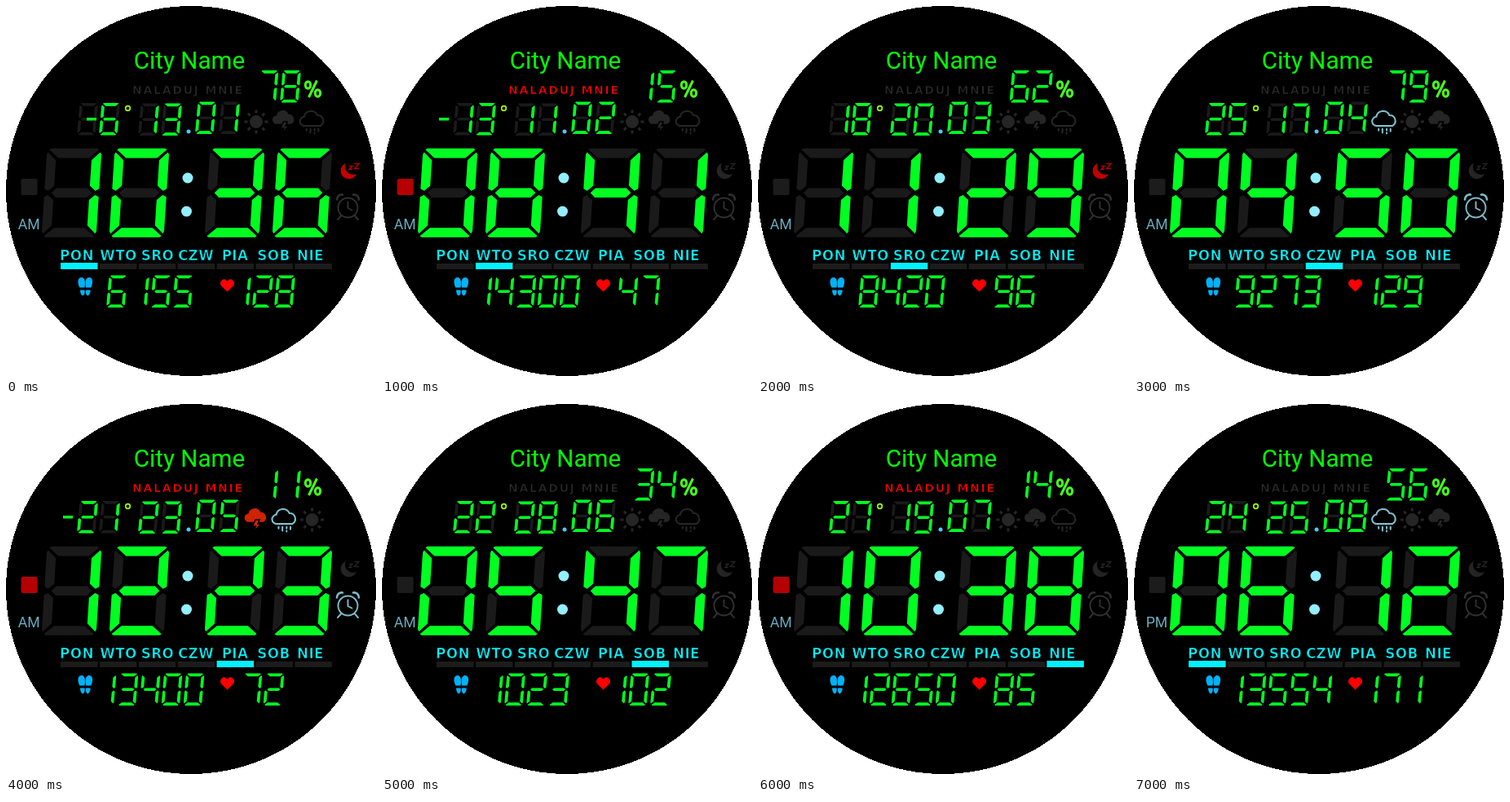
An HTML page for the animation above (8 s loop, 454x454 px).

```html
<!DOCTYPE html>
<html lang="pl">
<head>
<meta charset="utf-8">
<title>Digital watch face</title>
<style>
html, body { margin: 0; width: 100%; height: 100%; overflow: hidden; background: #fff; }
svg { display: block; width: 100vw; height: 100vh; }
.day, #charge { font-family: "DejaVu Sans", sans-serif; font-weight: 700; stroke: #000; stroke-width: .7; }
.day { font-size: 16.8px; letter-spacing: .4px; fill: #00f4ff; text-anchor: middle; }
#charge { font-size: 14px; letter-spacing: 1.75px; }
</style>
</head>
<body>
<svg viewBox="0 0 454 454">
  <defs>
    <path id="cloud" d="M-10 5a6 6 0 0 1-1-12a9 9 0 0 1 17-2a7.5 7.5 0 0 1 4 14z"/>
    <g id="sun" fill="currentColor" stroke="currentColor">
      <circle r="7.5"/>
      <path id="rays" stroke-width="3"/>
    </g>
    <g id="storm" fill="currentColor">
      <use href="#cloud" transform="translate(0 -1.5) scale(.87)"/>
      <path d="M-1 0H4L2 5H5.500L-2.500 15L-.5 8H-4.500Z" stroke="#000" stroke-width="1.6"/>
    </g>
    <g id="rain" fill="none" stroke="currentColor" stroke-width="2.2" stroke-linecap="round" transform="translate(.7 .4) scale(.94)">
      <use href="#cloud"/>
      <path d="M-8 9v2M-3 9v5M2.500 9v2M7.500 9v3M2.500 14v1"/>
    </g>
  </defs>
  <circle cx="227" cy="227" r="227" shape-rendering="crispEdges"/>
  <text x="225" y="77" font-family="Roboto, sans-serif" font-size="29.6" text-anchor="middle" fill="#00ff00">City Name</text>
  <text id="charge" x="155" y="108">NALADUJ MNIE</text>

  <path id="ghost" fill="#1a1a1a"/>
  <path id="lit" fill="#00ff21"/>

  <g fill="none" stroke="#48ff1a" stroke-width="3">
    <ellipse cx="370.5" cy="97" rx="3.2" ry="4.2"/>
    <ellipse cx="382.5" cy="107" rx="3.2" ry="4.2"/>
    <path d="M381.500 91.500L371.500 112"/>
  </g>
  <circle cx="149.500" cy="125.500" r="2.800" fill="none" stroke="#a4ff00" stroke-width="1.700"/>
  <circle cx="224" cy="154" r="2.500" fill="#55c4ff"/>
  <g fill="#92efff">
    <circle cx="223" cy="211" r="6.500"/>
    <circle cx="221.500" cy="252" r="6.500"/>
  </g>

  <g id="weather"></g>
  <rect id="link" x="18.500" y="212" width="20" height="20" rx="2"/>
  <text id="half" x="14.700" y="274" font-family="Roboto, sans-serif" font-size="17.600" fill="#69afc0"></text>

  <g id="moon" fill="currentColor">
    <path d="M417 193A10 10 0 1 0 430 206A9.800 9.800 0 0 1 417 193Z"/>
    <path d="M421 196.500h4l-4 4h4M427.500 193.500h5.500l-5.500 6h5.500" fill="none" stroke="currentColor" stroke-width="1.300"/>
  </g>
  <g id="alarm" fill="none" stroke="currentColor" stroke-width="1.900" stroke-linecap="round">
    <circle cx="419.500" cy="247.500" r="12"/>
    <path d="M419.500 240.500v7.500l5 2.500M411 257.500l-4 4.500M428 257.500l4 4.500"/>
    <path d="M406 237.500a6 6 0 0 1 7-6M433 237.500a6 6 0 0 0-7-6" stroke-width="2.600"/>
  </g>

  <g id="days"></g>

  <g fill="#00b2f8">
    <path id="foot" d="M92.500 333C97.500 333 97.500 340 96.500 345.500H90.500C88 342 87 333 92.500 333ZM91 348.500H96.500C98 357.500 91 357.500 91 348.500Z"/>
    <use href="#foot" transform="matrix(-1 0 0 1 194.600 0)"/>
  </g>
  <path fill="#ff0000" stroke="#ff0000" d="M271.500 350L264.800 343.500C260.500 338.500 268 332 271.500 338.500C275 332 282.500 338.500 278.200 343.500Z"/>
</svg>
<script>
const $ = id => document.getElementById(id);
const DAYS = ["PON", "WTO", "SRO", "CZW", "PIA", "SOB", "NIE"];
const DAY_X = [87, 138, 186, 233, 281, 328.5, 373.5];
const SEGS = ["abcdef", "bc", "abdeg", "abcdg", "bcfg", "acdfg", "acdefg", "abc", "abcdefg", "abcdfg"];
const BIG = { w: 67, h: 109, t: 11.6, g: 2.9, slant: 7 };
const SMALL = { w: 22.5, h: 39.5, t: 3.7, g: 1.5, slant: 3.5 };
const FAIR = ["sun", "storm", "rain"], WET = ["rain", "sun", "storm"], STORMY = ["storm", "rain", "sun"];

// One entry per second.
const STATES = [
  { time: "1036", temp: "-6", date: "1301", bat: "78", steps: "6155", pulse: "128", day: 0, sky: FAIR, moon: 1 },
  { time: "0841", temp: "-13", date: "1102", bat: "15", steps: "14300", pulse: "47", day: 1, sky: FAIR, link: 1 },
  { time: "1129", temp: "18", date: "2003", bat: "62", steps: "8420", pulse: "96", day: 2, sky: FAIR, moon: 1 },
  { time: "0450", temp: "25", date: "1704", bat: "79", steps: "9273", pulse: "129", day: 3, sky: WET, wet: 1, alarm: 1 },
  { time: "1223", temp: "-21", date: "2305", bat: "11", steps: "13400", pulse: "72", day: 4, sky: STORMY, wet: 1, bolt: 1, link: 1, alarm: 1 },
  { time: "0547", temp: "22", date: "2806", bat: "34", steps: "1023", pulse: "102", day: 5, sky: FAIR },
  { time: "1038", temp: "27", date: "1907", bat: "14", steps: "12650", pulse: "85", day: 6, sky: FAIR, link: 1 },
  { time: "0612", temp: "24", date: "2508", bat: "56", steps: "13554", pulse: "171", day: 0, sky: WET, wet: 1, pm: 1 }
];

function outline(seg, { w, h, t, g }) {
  const m = h / 2, k = t / 2;
  const top = [[g * 1.8, 0], [w - g * 1.8, 0], [w - g, g * .5], [w - t - g, t], [t + g, t], [g, g * .5]];
  const side = [[0, g * 2.6], [g * .5, g * 1.6], [t, t + g], [t, m - k - g], [k * .8, m - g * .9], [0, m - g * 1.7]];
  const mid = [[k + g, m], [t + g, m - k], [w - t - g, m - k], [w - k - g, m], [w - t - g, m + k], [t + g, m + k]];
  const mirror = p => p.map(([x, y]) => [w - x, y]);
  const flip = p => p.map(([x, y]) => [x, h - y]);
  return { a: top, b: mirror(side), c: mirror(flip(side)), d: flip(top), e: flip(side), f: side, g: mid }[seg];
}

function digit(segs, x, y, face) {
  return [...segs].map(s => "M" + outline(s, face).map(([px, py]) =>
    (x + px + face.slant * (1 - py / face.h)).toFixed(2) + " " + (y + py).toFixed(2)).join("L") + "Z").join("");
}

const number = (str, xs, y, face) =>
  [...str].map((c, i) => c === " " ? "" : digit(SEGS[c], xs[i], y, face)).join("");

const centred = (str, cx) =>
  number(str, [...str].map((c, i) => cx + (i - str.length / 2) * 27), 330.5, SMALL);

const TIME_X = [43.5, 126.5, 243.5, 326.5], TIME_Y = 174.8;
const TEMP_X = [87, 114], DATE_X = [162, 190], MONTH_X = [232, 261];

function minus(temp) {
  if (temp[0] !== "-") return "";
  return temp.length > 2 ? "M70 137h12v3.600h-12z" : "M99 137h12v3.600h-12z";
}

function tint(id, on, colour, off = "#242424") {
  $(id).setAttribute("color", on ? colour : off);
}

function show(s) {
  const temp = s.temp.replace("-", "").padStart(2, " ");
  $("lit").setAttribute("d",
    number(s.time, TIME_X, TIME_Y, BIG) +
    number(temp, TEMP_X, 119, SMALL) + minus(s.temp) +
    number(s.date.slice(0, 2), DATE_X, 119.5, SMALL) +
    number(s.date.slice(2), MONTH_X, 117.5, SMALL) +
    number(s.bat, [308.5, 336], 79, SMALL) +
    centred(s.steps, 177) + centred(s.pulse, 315.5));

  $("charge").setAttribute("fill", s.bat < 20 ? "#ff0000" : "#292929");
  $("link").setAttribute("fill", s.link ? "#b40000" : "#1c1c1c");
  $("half").textContent = s.pm ? "PM" : "AM";
  tint("moon", s.moon, "#c00000");
  tint("alarm", s.alarm, "#7dbccb", "#303030");

  const colour = { sun: "#252525", storm: s.bolt ? "#cf2300" : "#252525", rain: s.wet ? "#80bfcc" : "#252525" };
  $("weather").innerHTML = s.sky.map((kind, i) =>
    `<use href="#${kind}" color="${colour[kind]}" x="${307 + i * 34.3}" y="142"/>`).join("");

  DAYS.forEach((d, i) => {
    const bar = $("bar" + i), on = i === s.day;
    bar.setAttribute("fill", on ? "#00f4ff" : "#1c1c1c");
    bar.setAttribute("y", on ? 315 : 316);
    bar.setAttribute("height", on ? 8 : 7);
  });
}

$("rays").setAttribute("d", Array.from({ length: 8 }, (_, i) => {
  const a = i * Math.PI / 4, c = Math.cos(a), s = Math.sin(a);
  return `M${10.5 * c} ${10.5 * s}L${14.5 * c} ${14.5 * s}`;
}).join(""));

$("ghost").setAttribute("d",
  number("8888", TIME_X, TIME_Y, BIG) + number("88", TEMP_X, 119, SMALL) +
  number("88", DATE_X, 119.5, SMALL) + number("88", MONTH_X, 117.5, SMALL));

$("days").innerHTML = DAYS.map((d, i) =>
  `<text class="day" x="${DAY_X[i]}" y="312">${d}</text>` +
  `<rect id="bar${i}" x="${67 + i * 47.9}" width="45.5"/>`).join("");

let start = null, last = -1;
function tick(now) {
  if (start === null) start = now;
  const i = Math.floor((now - start) / 1000) % STATES.length;
  if (i !== last) show(STATES[last = i]);
  requestAnimationFrame(tick);
}
show(STATES[0]);
requestAnimationFrame(tick);
</script>
</body>
</html>
```
